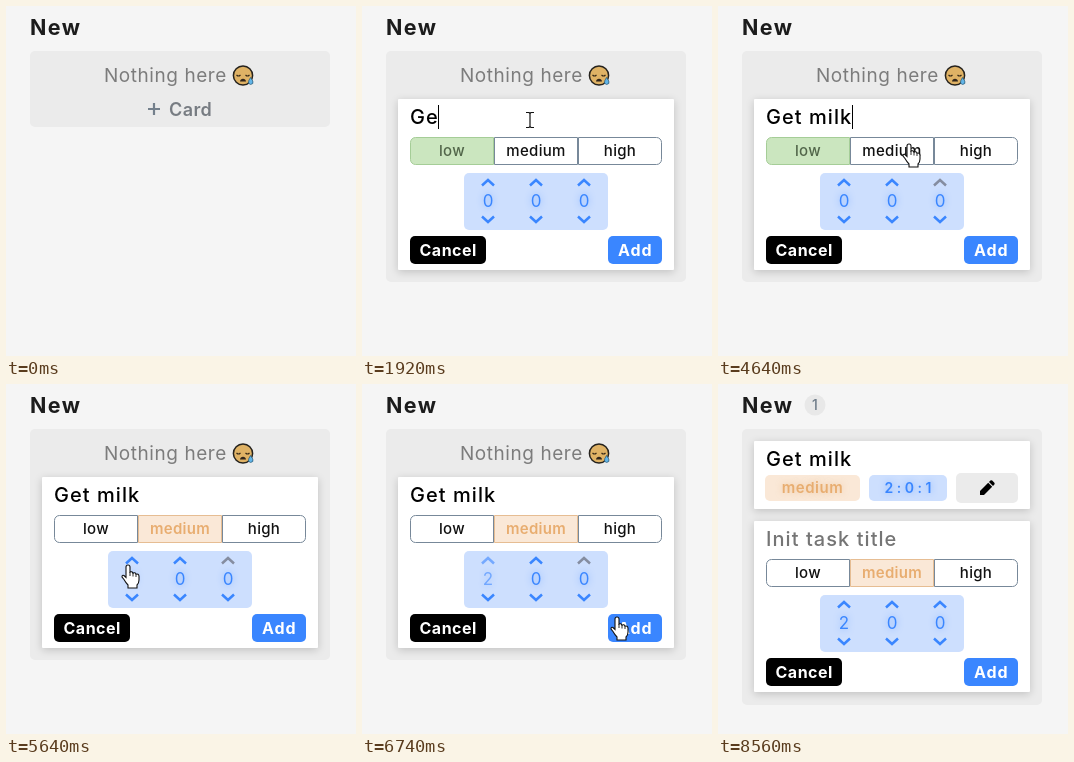
Write an HTML page with a canvas that moves like this. It is 350 px wide and 350 px high and loops after 8.66 s.

```html
<!DOCTYPE html>
<html lang="en">
<head>
<meta charset="utf-8">
<title>New task card</title>
<style>
html, body { margin: 0; width: 100%; height: 100%; overflow: hidden; background: #f5f5f5; }
canvas { display: block; width: 350px; height: 350px; }
</style>
</head>
<body>
<canvas id="stage"></canvas>
<script>
const LOOP = 8660, OPEN = 800, PICK = 4840, ADD = 7160, DONE = 7660;
const BLUE = '#3a86ff', PALE = '#cddffe', ORANGE = '#e8ad70', PEACH = '#fae8d7', SLATE = '#778899';
const canvas = document.getElementById('stage');
const c = canvas.getContext('2d');
const dpr = window.devicePixelRatio || 1;
canvas.width = canvas.height = 350 * dpr;

// Pointer stops: time, x, y, shape
const pointer = [
  [0, 0, 0, ''],
  [200, 144, 269, 'arrow'], [300, 147, 226, 'arrow'], [400, 153, 170, 'arrow'],
  [500, 159, 127, 'arrow'], [600, 162, 113, 'hand'],
  [800, 164, 114, 'beam'], [900, 167, 114, 'beam'], [1000, 168, 114, 'beam'],
  [4120, 175, 119, 'beam'], [4220, 193, 135, 'hand'], [4320, 214, 154, 'hand'],
  [4420, 220, 160, 'hand'], [4520, 205, 149, 'hand'], [4640, 191, 138, 'hand'],
  [4940, 186, 142, 'hand'], [5040, 172, 151, 'hand'], [5140, 153, 163, 'arrow'],
  [5240, 136, 174, 'hand'], [5340, 126, 180, 'hand'], [5440, 122, 181, 'hand'],
  [5740, 122, 178, 'hand'], [5840, 121, 172, 'hand'], [5940, 120, 166, 'hand'],
  [6040, 120, 161, 'hand'], [6140, 122, 170, 'hand'], [6240, 130, 179, 'hand'],
  [6340, 140, 183, 'hand'], [6440, 151, 187, 'arrow'],
  [6540, 184, 202, 'arrow'], [6640, 226, 221, 'arrow'], [6740, 255, 233, 'hand'],
  [6860, 262, 233, 'hand'], [7160, 260, 235, 'hand'], [7260, 257, 237, 'hand'],
  [7360, 254, 239, 'hand'], [7460, 252, 240, 'hand'], [7560, 251, 240, 'hand'],
  [7760, 0, 0, '']
];
const typing = [
  [0, ''], [1920, 'Ge'], [2220, 'Get'], [2520, 'Get '], [2820, 'Get m'],
  [2920, 'Get mi'], [3220, 'Get mil'], [3420, 'Get milk'], [ADD, '']
];
const hours = [[0, 0], [5740, 1], [6040, 2]];
const blinks = [900, 1400, 1920, 3920, 4420, PICK, ADD, DONE, 8360, 8560];

const at = (list, t) => list.findLast(step => step[0] <= t);

const hand = new Path2D('M-2 2Q-2 0 0 0Q2 0 2 2V7Q4 6 5 8.200Q7 7 8 9.200Q10.500 8.500 11 11V15Q11 18 9 20V23H0V20Q-2 18 -4 14.500L-6 12Q-6 9.500 -4 10.500L-2 12.500Z');
const knuckles = new Path2D('M2 7V11M5 8.200V11.500M8 9.200V12');
const arrow = new Path2D('M0 0V16L3.700 12.500L6.200 18.500L8.800 17.400L6.300 11.700H11.600Z');
const beam = new Path2D('M-4 -7.500H-1L0 -6.500L1 -7.500H4M0 -6.500V6.500M-4 7.500H-1L0 6.500L1 7.500H4');

function box(x, y, w, h, r, fill, shadow) {
  c.save();
  if (shadow) {
    c.shadowColor = 'rgba(0,0,0,.18)';
    c.shadowBlur = 8 * dpr;
    c.shadowOffsetY = 2 * dpr;
  }
  c.beginPath();
  c.roundRect(x, y, w, h, r);
  c.fillStyle = fill;
  c.fill();
  c.restore();
}

function text(s, x, y, size, weight, color, { gap = 0, align = 'left', glow } = {}) {
  c.save();
  c.font = `${weight} ${size}px Inter, "Open Sans", sans-serif`;
  c.letterSpacing = gap + 'px';
  c.textAlign = align;
  c.fillStyle = color;
  if (glow) {
    c.shadowColor = glow;
    c.shadowBlur = 6 * dpr;
  }
  c.fillText(s, x, y);
  const width = c.measureText(s).width;
  c.restore();
  return width;
}

function line(path, color, width) {
  c.strokeStyle = color;
  c.lineWidth = width;
  c.stroke(path instanceof Path2D ? path : new Path2D(path));
}

const title = (s, y, color) => text(s, 48, y, 20, 500, color, { gap: 1.05 });

function emoji(x, y) {
  c.save();
  c.translate(x, y);
  c.beginPath();
  c.arc(0, 0, 9.6, 0, 7);
  c.fillStyle = '#dfb265';
  c.fill();
  c.strokeStyle = '#25221d';
  c.lineWidth = 1.5;
  c.stroke();
  line('M-6.500 -0.500Q-4.500 1.500 -2.500 -0.500M2.500 -0.500Q4.500 1.500 6.500 -0.500', '#3a2c18', 1.1);
  c.fillStyle = '#30241a';
  c.fill(new Path2D('M-3 6Q-2.500 3.200 0 3.200Q2.500 3.200 3 6Z'));
  const tear = new Path2D('M7.500 2Q11 6 9.800 8Q7.500 10 5.500 7.800Q5 5.500 7.500 2Z');
  c.fillStyle = '#62b5e8';
  c.fill(tear);
  line(tear, '#28536e', 0.7);
  c.restore();
}

function segments(chosen) {
  ['low', 'medium', 'high'].forEach((name, i) => {
    const on = i === chosen;
    const [fill, edge, ink] = !on ? ['#fff', SLATE, '#111']
      : i ? [PEACH, '#e6bd93', ORANGE] : ['#cbe6bf', '#a5cd97', '#52664a'];
    const left = i === 0 ? 5 : 0, right = i === 2 ? 5 : 0;
    const x = 48.5 + 84 * i;
    c.beginPath();
    c.roundRect(x, 131.5, 83, 27, [left, right, right, left]);
    c.fillStyle = fill;
    c.fill();
    c.strokeStyle = edge;
    c.lineWidth = 1;
    c.stroke();
    text(name, x + 41.5, 150, 15, on && i ? 600 : 500, ink, { gap: 0.3, align: 'center' });
  });
}

function counter(i, value, t) {
  const x = 126 + 48 * i;
  const faded = i === 0 && t >= 6140 && t < DONE;
  const grey = i === 2 && t >= 4320 && t < DONE;
  c.globalAlpha = faded ? 0.6 : 1;
  line(`M${x - 6} 179.500l6 -5.500l6 5.500`, grey ? '#858da0' : BLUE, 2.5);
  text(value, x, 201, 17, 400, BLUE, { align: 'center', glow: 'rgba(58,134,255,.5)' });
  c.globalAlpha = 1;
  line(`M${x - 6} 210.500l6 5.500l6 -5.500`, BLUE, 2.5);
}

function form(t) {
  box(36, 93, 276, 171, 1, '#fff', true);
  const typed = at(typing, t)[1];
  const width = typed ? title(typed, 118, '#000') : 0;
  if (!typed) title('Init task title', 118, '#757575');
  if (blinks.filter(b => b <= t).length % 2) box(48 + Math.floor(width), 99, 1, 24, 0, '#000');
  segments(t < PICK ? 0 : 1);
  box(102, 167, 144, 57, 5, PALE);
  [at(hours, t)[1], 0, 0].forEach((value, i) => counter(i, value, t));
  box(48, 230, 76, 28, 5, '#000');
  text('Cancel', 57.5, 250, 16, 700, '#fff', { gap: 0.5 });
  box(246, 230, 54, 28, 5, BLUE);
  text('Add', 256, 250, 16, 700, '#fff', { gap: 0.9 });
}

function card() {
  box(36, 57, 276, 68, 1, '#fff', true);
  title('Get milk', 82, '#000');
  box(47, 91, 95, 26, 5, PEACH);
  text('medium', 94.5, 109, 15, 600, ORANGE, { gap: 0.5, align: 'center', glow: 'rgba(232,173,112,.5)' });
  box(151, 91, 78, 26, 5, PALE);
  text('2 : 0 : 1', 190, 109, 14, 600, BLUE, { align: 'center', glow: 'rgba(58,134,255,.5)' });
  box(238, 89, 62, 30, 5, '#ebebeb');
  c.fillStyle = '#000';
  c.fill(new Path2D('M262 111V107L270.200 98.800L274.200 102.800L266 111ZM271 98L272.400 96.600Q273.300 96 274.200 96.600L276.400 98.800Q277 99.700 276.400 100.600L275 102Z'));
}

function cursor(t) {
  const [, x, y, shape] = at(pointer, t);
  if (!shape) return;
  c.save();
  c.translate(x, y);
  if (shape === 'beam') {
    line(beam, '#fff', 2.5);
    line(beam, '#111', 1.2);
  } else {
    const path = shape === 'hand' ? hand : arrow;
    c.fillStyle = '#fff';
    c.fill(path);
    line(path, '#111', 1.1);
    if (shape === 'hand') line(knuckles, '#111', 0.9);
  }
  c.restore();
}

function draw(now) {
  const t = now % LOOP;
  const open = t >= OPEN, done = t >= DONE;
  c.setTransform(dpr, 0, 0, dpr, 0, 0);
  c.fillStyle = '#f5f5f5';
  c.fillRect(0, 0, 350, 350);
  text('New', 24, 29, 21.5, 700, '#1c1c1c', { gap: 1.4 });
  box(24, 45, 300, done ? 276 : open ? 231 : 76, 5, '#ebebeb');
  if (done) {
    box(86.5, 10.5, 21, 21, 10.5, '#e8e8e8');
    text('1', 97, 26, 14, 500, '#6d7b88', { align: 'center' });
    card();
  } else {
    text('Nothing here', 98, 76, 19, 400, '#7c7c7c', { gap: 0.55 });
    emoji(237, 69.5);
  }
  if (open) {
    c.save();
    if (done) c.translate(0, 44);
    form(t);
    c.restore();
  } else {
    line('M142 103H154M148 97V109', '#74808c', 2.2);
    text('Card', 163, 110, 18, 600, '#777c82', { gap: 0.4 });
  }
  cursor(t);
  requestAnimationFrame(draw);
}
requestAnimationFrame(draw);
</script>
</body>
</html>
```
